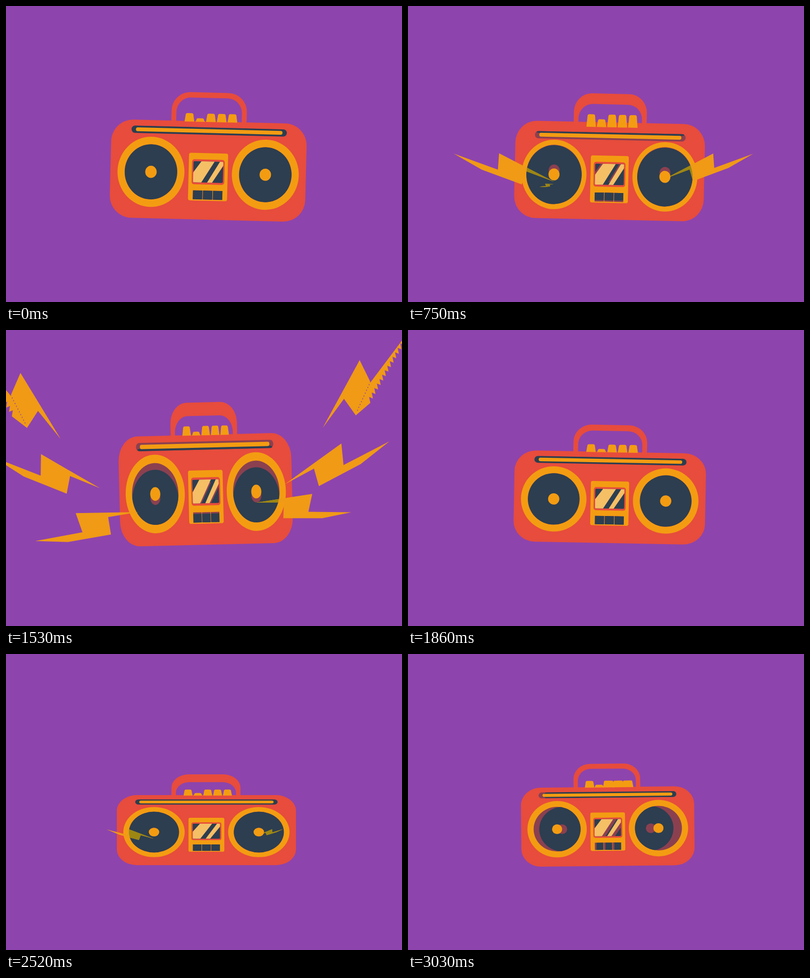
Recreate the animation shown at these times as an HTML page with a canvas. Size 800 by 600 pixels, loop 3060 ms.

```html
<!DOCTYPE html>
<html lang="en">
<head>
<meta charset="utf-8">
<title>Boombox</title>
<style>
  html, body { margin: 0; width: 100%; height: 100%; overflow: hidden; background: #8e44ad; }
  canvas { display: block; width: 100%; height: 100%; }
</style>
</head>
<body>
<canvas id="stage" width="800" height="600"></canvas>
<script>
const ctx = document.getElementById('stage').getContext('2d');
const LOOP = 3060, BEAT = LOOP / 5, STEP = 30;
const PURPLE = '#8e44ad', RED = '#e74c3c', ORANGE = '#f39c12', NAVY = '#2c3e50',
      MAROON = '#8b4050', CREAM = '#f5bf65', BOLT = '#f09a16', OLIVE = '#9c8713';
const { sin, cos, exp, min, max, PI } = Math;
const clamp = v => min(1, max(0, v));

// Key poses of the squash within one beat
const POSES = [
  { p: 0,    width: 395, height: 199, tilt: 1.45 },
  { p: .118, width: 362, height: 142, tilt: 0 },
  { p: .225, width: 383, height: 197, tilt: 1.27 },
  { p: .5,   width: 349, height: 223, tilt: -1.4 },
  { p: .578, width: 334, height: 166, tilt: -.6 },
  { p: .814, width: 329, height: 185, tilt: -3.4 },
  { p: .951, width: 350, height: 160, tilt: -.6 }
];
POSES.push({ ...POSES[0], p: 1 });

// Each bolt grows from its speaker at `born` and its inner tip sets off at `leave` (ms).
const BOLTS = [
  { side: -1, y: 75, slope: -.83, born: 145, leave: 140, size: 195, upper: true },
  { side: -1, y: 19, slope: -.25, born: 30,  leave: 208, size: 245 },
  { side: -1, y: 24, slope: .2,   born: 127, leave: 275, size: 240 },
  { side: 1,  y: 18, slope: -.83, born: 145, leave: 185, size: 195, upper: true },
  { side: 1,  y: 8,  slope: -.3,  born: 52,  leave: 255, size: 245 },
  { side: 1,  y: 20, slope: .1,   born: 150, leave: 310, size: 220 }
];
const BOLT_SPEED = 1.3, GROW = 170;
const SPEAKER_X = 117, SPEAKER_Y = 5.5, RING = 68.5;

// Bolt outline along (u) and across (v) the line from inner tip to outer tip
const HEAD = [[0, 0], [.32, -.08], [.58, -.145], [.55, .04], [1, 0]];
const TAIL = [[.29, .13], [.287, -.03]];
const FRAY = Array.from({ length: 29 }, (_, i) =>
  [1 - .55 * i / 28, .03 + .12 * i / 28 - (i % 2) * .035]);

function poseAt(p) {
  const n = POSES.findIndex(pose => pose.p > p);
  const a = POSES[n - 1], b = POSES[n];
  const k = (1 - cos(PI * (p - a.p) / (b.p - a.p))) / 2;
  const mix = name => a[name] + (b[name] - a[name]) * k;
  return { width: mix('width'), height: mix('height'), tilt: mix('tilt') };
}

function fill(color, path) {
  ctx.fillStyle = color;
  ctx.beginPath();
  path();
  ctx.fill('evenodd');
}

function clipTo(path, paint) {
  ctx.save();
  ctx.beginPath();
  path();
  ctx.clip();
  paint();
  ctx.restore();
}

function poly(points) {
  points.forEach(([x, y], i) => i ? ctx.lineTo(x, y) : ctx.moveTo(x, y));
  ctx.closePath();
}

// Rounded box centred on x, y
const box = (x, y, w, h, r) => () => ctx.roundRect(x - w / 2, y - h / 2, w, h, r);
const oval = (x, y, rx, ry) => () => ctx.ellipse(x, y, rx, ry, 0, 0, 7);

// An opening whose dark inside slides and bares its wall
function recess(path, dx, dy) {
  fill(MAROON, path);
  clipTo(path, () => {
    ctx.translate(dx, dy);
    fill(NAVY, path);
  });
}

function drawBolts(t, color) {
  for (const { side, y, slope, born, leave, size, upper } of BOLTS) {
    if (t <= born) continue;
    const rest = 1 - clamp((t - born) / GROW);
    const length = size * (1 - rest * rest);
    const far = max(0, t - leave) * BOLT_SPEED;
    const thick = upper ? 1 : .82;
    const place = ([u, v]) => {
      const x = far + length * (u - v * thick * slope);
      const drop = y + far * slope + length * (u * slope + v * thick);
      return [side * (SPEAKER_X + x), SPEAKER_Y + drop];
    };
    const edge = upper ? FRAY : [[.7, .09]];
    fill(color, () => poly([...HEAD, ...edge, ...TAIL].map(place)));
    if (!upper || color !== BOLT) continue;
    ctx.strokeStyle = PURPLE;
    ctx.lineWidth = 1.6;
    ctx.setLineDash([2, 4]);
    ctx.beginPath();
    ctx.moveTo(...place([.6, .02]));
    ctx.lineTo(...place([.31, .118]));
    ctx.stroke();
    ctx.setLineDash([]);
  }
}

function drawHandle(thick) {
  fill(RED, () => {
    ctx.roundRect(-78, -159, 154, 100, [38, 38, 0, 0]);
    ctx.roundRect(-68, -159 + thick, 134, 100 - thick, [30, 30, 0, 0]);
  });
}

function drawKeys(spread, nod) {
  for (let i = 0; i < 5; i++) {
    const x = -41 + 22 * i, base = -99 + nod, top = -100 - (i === 1 ? 6 : 16);
    const grow = i > 1 ? spread * 3 : spread, a = 8 + grow, b = 10 + grow;
    fill(ORANGE, () => {
      ctx.moveTo(x - b, base);
      ctx.lineTo(x - a, top + 4);
      ctx.quadraticCurveTo(x - a, top, x - a + 4, top);
      ctx.lineTo(x + a - 4, top);
      ctx.quadraticCurveTo(x + a, top, x + a, top + 4);
      ctx.lineTo(x + b, base);
    });
  }
}

function drawDeck(y, dx, dy) {
  ctx.save();
  ctx.translate(0, y);
  fill(ORANGE, box(0, 13, 80, 97, 4));
  fill(RED, box(0, 3, 67, 51, 5));
  const glass = box(0, 3, 61, 43, 2);
  const shine = () => {
    poly([[-14, -19], [13, -19], [-14, 25], [-31, 25], [-31, 5]]);
    poly([[24, -19], [31, -19], [31, -11], [8, 25], [-2, 25]]);
  };
  fill(NAVY, glass);
  clipTo(glass, () => {
    ctx.translate(dx, dy);
    fill(MAROON, shine);
    ctx.translate(-dx, -dy);
    fill(CREAM, shine);
  });
  for (let i = -1; i <= 1; i++) recess(box(20.5 * i, 50, 19.5, 18.5, 0), dx * .5, dy * .5);
  ctx.restore();
}

function draw(time) {
  const t = time % BEAT, p = t / BEAT;
  const { width, height, tilt } = poseAt(p);
  const sx = width / 400, sy = height / 200;
  const bottom = 428 + (height - 142) * .09;

  const nod = 9 * exp(-(((p - .225) / .06) ** 2));
  const thick = 10 + 18 * sin(PI * (p + .07)) ** 2;
  const dip = 14 * sin(PI * (p - .05)) ** 4;
  const late = max(0, p * 4 - 3);
  const sway = -1.25 * late * sin(2 * PI * late);
  const ratio = .82 - .035 * cos(4 * PI * p);

  const cones = [-1, 1].map(side => {
    const x = side * SPEAKER_X, y = SPEAKER_Y + nod * .45;
    const dx = sway * (side < 0 ? 12 : -18) / sx, dy = dip / sy;
    return {
      x, y, dx, dy,
      shadeX: dx * (dx * side > 0 ? 2 : .9), shadeY: dy * .65 - nod,
      hole: oval(x, y, RING * ratio, (RING + 3) * ratio)
    };
  });
  const { shadeX, shadeY } = cones[0];

  ctx.setTransform(1, 0, 0, 1, 0, 0);
  ctx.fillStyle = PURPLE;
  ctx.fillRect(0, 0, 800, 600);

  ctx.translate(403 + (width - 345) * .11, bottom - height / 2);
  ctx.rotate(tilt * PI / 180);
  ctx.scale(sx, sy);

  drawHandle(thick / sy);
  fill(RED, box(0, 0, 400, 200, 45));
  drawKeys(clamp(late * 4), nod);
  recess(box(0, -80.5 + nod, 318, 15, 7.5), shadeX, shadeY * 1.4);
  fill(ORANGE, box(0, -80.5 + nod, 300, 7.8, 3.9));
  drawDeck(nod * .45, shadeX * .7, shadeY * .7);
  for (const c of cones) {
    fill(ORANGE, oval(c.x, c.y, RING, RING + 3));
    recess(c.hole, c.dx, c.dy);
    fill(MAROON, oval(c.x + c.shadeX, c.y + c.shadeY, 11.5, 12.2));
  }
  drawBolts(t, BOLT);
  for (const c of cones) {
    clipTo(c.hole, () => drawBolts(t, OLIVE));
    fill(ORANGE, oval(c.x, c.y, 11.7, 12.4));
  }
}

let start;
function tick(now) {
  if (start === undefined) start = now;
  draw(Math.floor((now - start) % LOOP / STEP) * STEP);
  requestAnimationFrame(tick);
}
draw(0);
requestAnimationFrame(tick);
</script>
</body>
</html>
```
